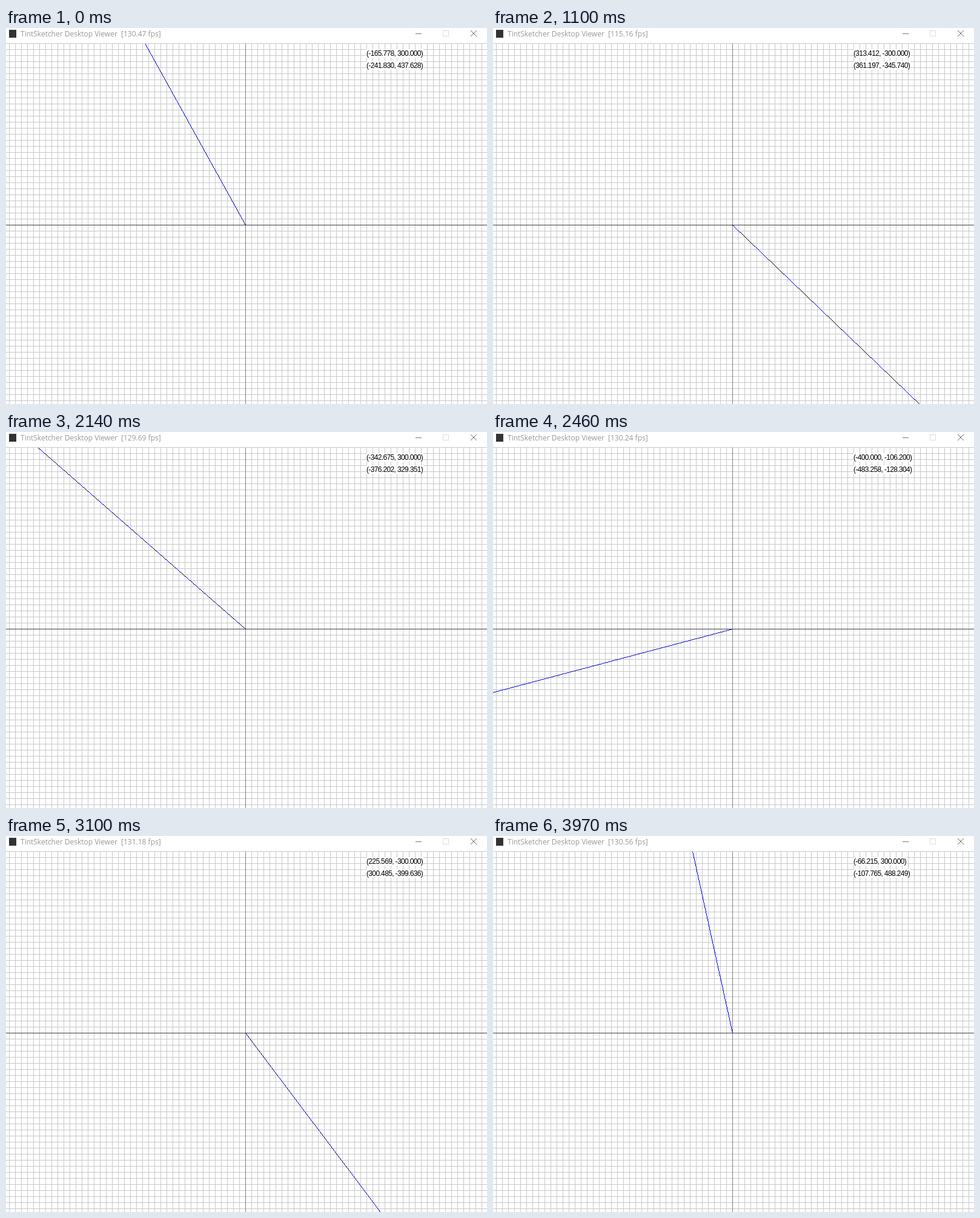
Animation, 794 px wide and 621 px high, one loop 4.05 s. Source, as an HTML page with a canvas:

```html
<!DOCTYPE html>
<html lang="en">
<head>
<meta charset="utf-8">
<title>Rotating line</title>
<style>
  html, body { margin: 0; width: 100%; height: 100%; overflow: hidden; background: #fff; }
  canvas { display: block; width: 794px; height: 621px; }
</style>
</head>
<body>
<canvas id="stage" width="794" height="621"></canvas>
<script>
const W = 794, H = 621, LOOP = 4050, STEPS = 51;
const CX = 395, CY = 325, TOP = 26, RADIUS = 500;
const ctx = document.getElementById('stage').getContext('2d');

// Known tip positions: [step, x, y]
const TIPS = [
  [0, -241.830, 437.628], [7, -394.353, -307.384], [14, 361.197, -345.740],
  [27, -376.201, 329.351], [35, -163.288, -472.585], [42, 490.71, -95.92],
  [43, 498.614, 37.203], [50, -107.765, 488.249]
];
const FPS = ['130.47', '129.81', '115.16', '130.12', '129.69', '130.24', '131.18', '130.46', '130.56'];

// Unwrap the tip directions into a steadily growing angle.
const keys = [];
for (const [step, x, y] of TIPS) {
  let angle = Math.atan2(y, x);
  const last = keys.length ? keys[keys.length - 1].angle : 0;
  while (angle < last) angle += 2 * Math.PI;
  keys.push({ step, angle });
}

// Steps last 80 ms, apart from three that are 10 ms shorter.
const stepTime = i => i * 80 - 10 * ((i >= 1) + (i >= 4) + (i >= 46));

function stepAt(t) {
  let i = STEPS - 1;
  while (i > 0 && stepTime(i) > t) i--;
  return i;
}

function angleAt(step) {
  let k = 0;
  while (k < keys.length - 2 && keys[k + 1].step <= step) k++;
  const a = keys[k], b = keys[k + 1];
  return a.angle + (b.angle - a.angle) * (step - a.step) / (b.step - a.step);
}

function rect(color, x, y, w, h) {
  ctx.fillStyle = color;
  ctx.fillRect(x, y, w, h);
}

function text(str, x, y, font, color, spacing = '0px') {
  ctx.font = font;
  ctx.letterSpacing = spacing;
  ctx.fillStyle = color;
  ctx.fillText(str, x, y);
}

function drawTitleBar(fps) {
  const font = '12px "Open Sans", "Noto Sans", sans-serif';
  rect('#333', 5, 3, 12, 13);
  text('TintSketcher Desktop Viewer', 24, 14, font, '#999');
  text(`[${fps} fps]`, 190, 14, font, '#999');

  rect('#777', 676, 9, 10, 1);
  ctx.lineWidth = 1;
  ctx.strokeStyle = '#ddd';
  ctx.strokeRect(721.5, 4.5, 9, 9);
  ctx.strokeStyle = '#666';
  ctx.beginPath();
  ctx.moveTo(767, 4);
  ctx.lineTo(777, 14);
  ctx.moveTo(777, 4);
  ctx.lineTo(767, 14);
  ctx.stroke();
}

function drawGrid() {
  for (let x = 5; x < W; x += 10) rect('#c8c8c8', x, TOP, 1, H - TOP);
  for (let y = 25; y < H; y += 10) rect('#c8c8c8', 0, y, W, 1);
  rect('#808080', CX, TOP, 1, H - TOP);
  rect('#404040', 0, CY, W, 1);
}

// Hard-edged line; a pixel alone in its 2x2 cell turns black.
function drawLine(x, y) {
  const dx = Math.round(x), dy = -Math.round(y);
  const n = Math.max(Math.abs(dx), Math.abs(dy));
  const points = [], cells = new Map();
  for (let i = 0; i <= n; i++) {
    const px = CX + Math.round(dx * i / n), py = CY + Math.round(dy * i / n);
    const cell = (px >> 1) + (py >> 1) * W;
    points.push([px, py, cell]);
    cells.set(cell, (cells.get(cell) || 0) + 1);
  }
  for (const [px, py, cell] of points) {
    if (py >= TOP) rect(cells.get(cell) > 1 ? '#0000ff' : '#000', px, py, 1, 1);
  }
}

function drawLabel(x, y, top) {
  const font = '12px "Liberation Sans", Arial, sans-serif';
  const label = `(${x.toFixed(3)}, ${y.toFixed(3)})`;
  ctx.font = font;
  ctx.letterSpacing = '-0.65px';
  rect('#fff', 595, top, Math.round(ctx.measureText(label).width) + 1, 14);
  text(label, 595, top + 11, font, '#000', '-0.65px');
}

function draw(t) {
  const step = stepAt(t);
  const angle = angleAt(step);
  const x = RADIUS * Math.cos(angle), y = RADIUS * Math.sin(angle);
  const clip = Math.min(1, 400 / Math.abs(x), 300 / Math.abs(y));

  rect('#fff', 0, 0, W, H);
  drawTitleBar(FPS[Math.floor((stepTime(step) + 250) / 500)]);
  drawGrid();
  drawLine(x * clip, y * clip);
  drawLabel(x * clip, y * clip, 35);
  drawLabel(x, y, 55);
}

const start = performance.now();
function tick() {
  draw((performance.now() - start) % LOOP);
  requestAnimationFrame(tick);
}
tick();
</script>
</body>
</html>
```
